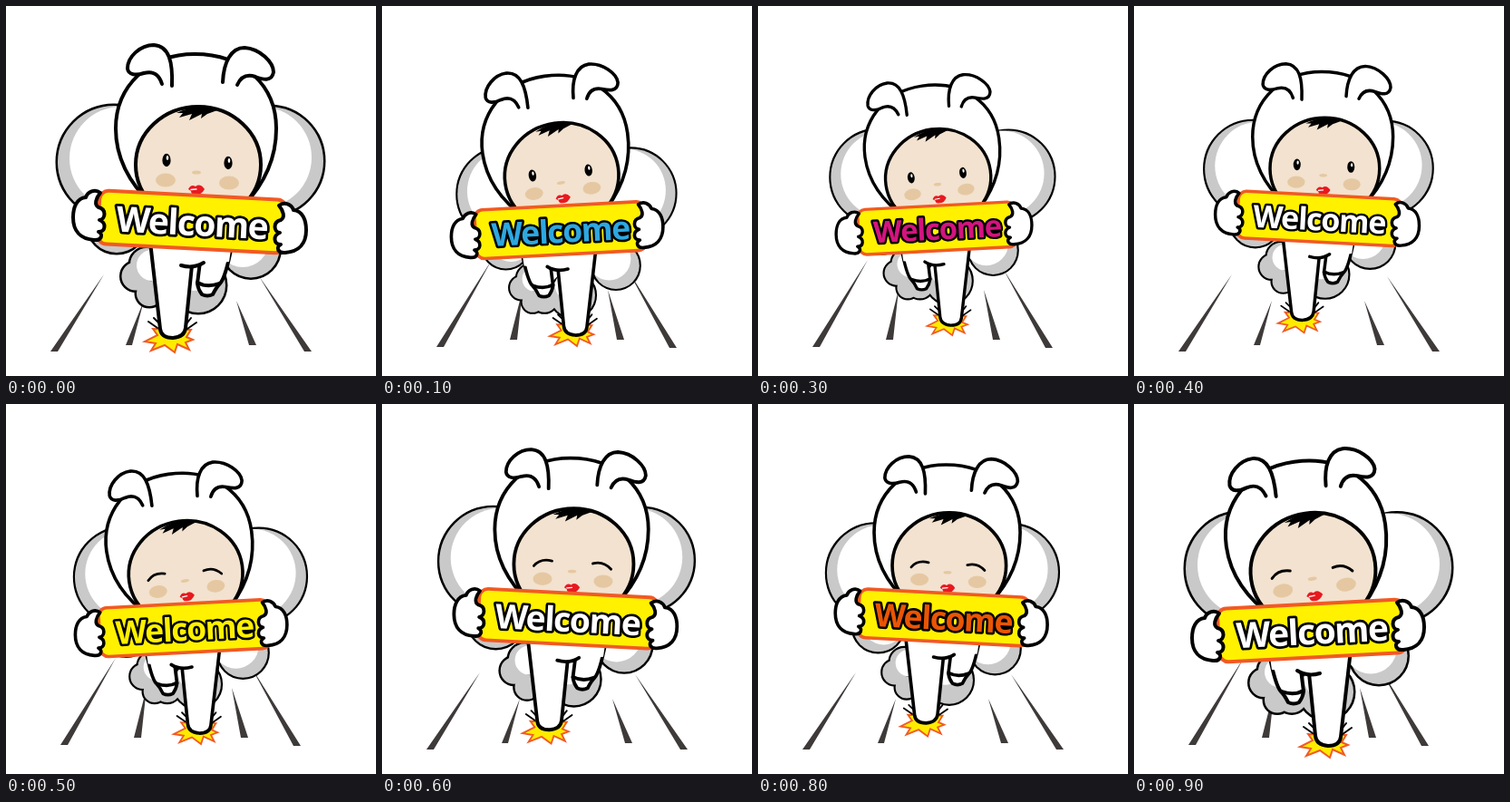
Write an HTML page that moves like this. It is 408 px wide and 408 px high and loops after 1000 ms.

```html
<!DOCTYPE html>
<html lang="en">
<head>
<meta charset="utf-8">
<title>Welcome</title>
<style>
html, body { margin: 0; width: 100%; height: 100%; overflow: hidden; background: #fff; }
svg { display: block; width: 100vw; height: 100vh; }
.line { fill: #fff; stroke: #000; stroke-width: 4; stroke-linecap: round; stroke-linejoin: round; }
.open { fill: none; }
.floor { fill: #3e3a39; }
.edge { fill: #000; stroke: #000; stroke-width: 5; }
.shade { fill: #c9c9ca; }
.light { fill: #fff; }
.blush { fill: #e5c8a2; }
.word { font: 700 39px "Open Sans", "Noto Sans", sans-serif; letter-spacing: -1.5px; text-anchor: middle;
  stroke: #000; stroke-width: 5.5; stroke-linejoin: round; paint-order: stroke; }
</style>
</head>
<body>
<svg viewBox="0 0 408 408">
  <defs>
    <g id="balls">
      <circle cx="119" cy="172" r="62"/><circle cx="290" cy="171" r="60"/>
      <circle cx="122" cy="240" r="32"/><circle cx="270" cy="268" r="31.5"/>
    </g>
    <g id="puffs">
      <circle cx="155" cy="285" r="18"/><circle cx="143" cy="298" r="15.5"/>
      <circle cx="158" cy="317" r="14"/><circle cx="174" cy="314" r="17"/>
      <circle cx="212" cy="308" r="30"/>
    </g>
    <g id="cloud">
      <use href="#balls" class="edge"/>
      <use href="#balls" class="shade"/>
      <g class="light">
        <circle cx="127" cy="168" r="57"/><circle cx="281" cy="167" r="56"/>
        <circle cx="129" cy="235" r="28"/><circle cx="261" cy="259" r="29"/>
      </g>
      <use href="#puffs" class="edge"/>
      <use href="#puffs" class="shade"/>
      <g class="light">
        <circle cx="161" cy="286" r="17"/><circle cx="207" cy="295" r="19"/>
      </g>
    </g>

    <g id="burst">
      <path d="M162 356L167 363L153 370L165 372L160 380L175 374L186 382L189 373L202 379L198 371L206 368L199 365L204 357Z"
        fill="#ffeb00" stroke="#f15a24" stroke-width="2"/>
      <path class="line open" style="stroke-width:2" d="M157 348L167 355M163 344L170 351M197 353L204 344M200 356L210 349"/>
    </g>

    <g id="legs">
      <path class="line" d="M214 282L211 306Q212 313 216 318Q222 321 228 318Q232 310 236 306Q242 300 249 264"/>
      <path class="line open" d="M211 305Q222 311 235 306"/>
      <path class="line" d="M159 260L170 356Q171 366 184 366Q197 365 198 355L205 286"/>
      <path class="light" d="M162 258L249 262L246 282L207 286L165 290Z"/>
      <path class="line open" d="M193 286Q207 290 218 283"/>
    </g>

    <path id="hand" class="line" d="M104 206C98 201 90 205 88 211C78 212 74 222 74 233C74 248 82 257 97 258
      C105 259 108 252 102 249C110 249 111 239 103 236C110 235 111 224 102 222C97 219 99 212 104 206Z"/>

    <g id="head">
      <path class="line" d="M162 220C132 192 121 162 121 135C121 88 158 53 208 53C262 53 298 88 298 135C298 164 287 194 262 220"/>
      <path class="line" d="M172 86C168 73 160 72 152 74C143 77 135 76 134 69C134 56 148 43 163 43C180 44 184 62 183 88"/>
      <path class="line" d="M239 84C240 62 248 46 263 46C280 47 295 62 295 73C293 84 283 81 275 78C266 75 259 78 255 87"/>
      <ellipse cx="212" cy="175" rx="69" ry="64" class="line" style="fill:#f2e2cf"/>
      <path d="M188 118Q210 107 233 115L222 119L215 124L216 119L202 126L205 119L191 123L195 118Z"/>
      <g class="blush">
        <ellipse cx="176" cy="192" rx="11" ry="7.5"/><ellipse cx="246" cy="195" rx="11" ry="7.5"/>
        <ellipse cx="210" cy="183.5" rx="5" ry="2"/>
      </g>
      <path d="M201 202Q204 196 209 199Q214 195 219 202Q215 209 209 208Q204 208 204 204Z" fill="#e8191f"/>
      <path d="M204 202.5L210 202" stroke="#fff" stroke-width="1.3" stroke-linecap="round"/>
    </g>
    <g id="open">
      <ellipse cx="177" cy="170" rx="4.6" ry="7.2"/><ellipse cx="245" cy="173" rx="4.6" ry="7.2"/>
      <g class="light">
        <ellipse cx="178" cy="167.5" rx="1.3" ry="2.4"/><ellipse cx="246" cy="170.5" rx="1.3" ry="2.4"/>
      </g>
    </g>
    <path id="closed" class="line open" style="stroke-width:3" d="M166 177Q174 168 187 171.5M234 174.5Q246 171 255 181"/>
  </defs>

  <path id="floor" class="floor"/>
  <use id="sky" href="#cloud"/>
  <g id="figure">
    <use id="spark" href="#burst"/>
    <use id="body" href="#legs"/>
    <g id="face">
      <use href="#head"/>
      <use id="eyes"/>
    </g>
    <g id="sign">
      <rect x="-103" y="-29.5" width="206" height="59" rx="10" fill="#fff100" stroke="#f15a24" stroke-width="4"/>
      <text id="word" class="word" y="15">Welcome</text>
    </g>
    <use id="left" href="#hand"/>
    <use id="right" href="#hand"/>
  </g>
</svg>
<script>
const $ = id => document.getElementById(id);
const move = (id, value) => $(id).setAttribute("transform", value);
const zoom = (x, y, s, dy = 0) => `translate(${x} ${y + dy}) scale(${s}) translate(${-x} ${-y})`;

// Two running poses, one for each planted foot.
const poses = [
  {
    pivot: [199, 209], drop: 0,
    floor: "M108 296L49 381H57ZM152 325L132 374H139ZM254 325L268 374H276ZM279 298L329 381H337Z",
    parts: {
      spark: "", body: "", face: "", sign: "translate(205 238) rotate(3)",
      left: "", right: "translate(405 14) scale(-1 1)"
    }
  },
  {
    pivot: [205, 218.5], drop: 9.5,
    floor: "M121 280L60 376H68ZM155 313L141 368H149ZM249 313L259 368H267ZM271 291L317 377H325Z",
    parts: {
      spark: "translate(30 8)", body: "translate(398 11) scale(-1 1)",
      face: "translate(-15 9.2) rotate(-8 211 171.5)", sign: "translate(196 250) rotate(-3)",
      left: "translate(-10 25)", right: "translate(394 13) scale(-1 1)"
    }
  }
];

// Each step: figure scale, cloud scale, cloud drop, lettering colour.
const steps = [
  [1, 1, 0, "#fff"],
  [.912, .82, 20, "#2ea7e0"],
  [.875, .83, 10, "#fff"],
  [.843, .84, 2, "#d4147f"],
  [.875, .855, 3, "#fff"],
  [.912, .87, 5, "#fff100"],
  [.957, .957, 0, "#fff"],
  [.935, .91, 5, "#8fc31f"],
  [.91, .87, 10, "#ea5504"],
  [1, 1, 0, "#fff"]
];

let shown = -1;

function draw(ms) {
  const i = Math.floor(ms % 1000 / 100);
  if (i === shown) return;
  shown = i;
  const [size, puff, drop, colour] = steps[i];
  const pose = poses[i % 2];
  $("floor").setAttribute("d", pose.floor);
  for (const id in pose.parts) move(id, pose.parts[id]);
  move("figure", zoom(...pose.pivot, size));
  move("sky", zoom(203, 205, puff, drop + pose.drop));
  $("eyes").setAttribute("href", i < 5 ? "#open" : "#closed");
  $("word").setAttribute("fill", colour);
}

const start = performance.now();
function tick() {
  draw(performance.now() - start);
  requestAnimationFrame(tick);
}
tick();
</script>
</body>
</html>
```
